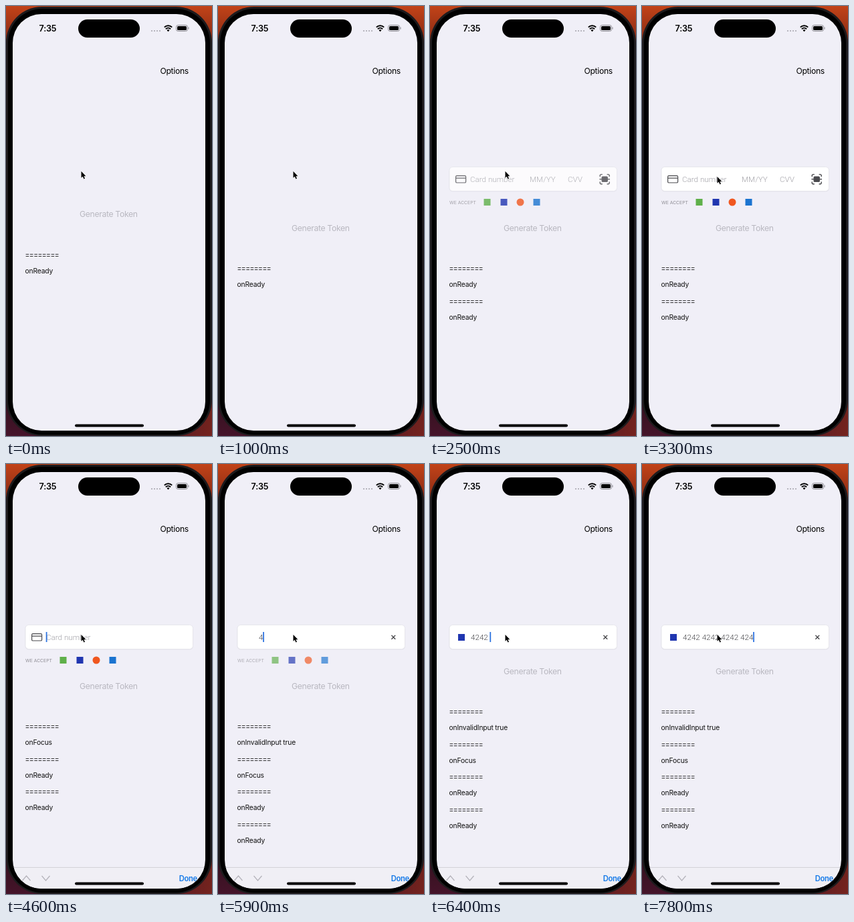
Recreate the animation shown at these times as an HTML page. Size 308 by 640 pixels, loop 8 s.

```html
<!DOCTYPE html>
<html lang="en">
<head>
<meta charset="utf-8">
<title>Card form</title>
<style>
  html, body { margin: 0; width: 100%; height: 100%; overflow: hidden; background: #000; }
  svg { display: block; }
  text { font-family: Inter, sans-serif; }
  .body { font-size: 12.2px; letter-spacing: -.33px; }
  .log text { font-size: 10.3px; letter-spacing: -.16px; fill: #111; }
  .log .rule { letter-spacing: -.5px; }
  .field text { font: 300 11.65px Roboto, sans-serif; }
  .hint { fill: #a3a2a8; }
</style>
</head>
<body>
<svg width="308" height="640" viewBox="0 0 308 640">
  <defs>
    <linearGradient id="wall" x2="0" y2="1">
      <stop stop-color="#c24318"/><stop offset=".1" stop-color="#7a2414"/>
      <stop offset=".9" stop-color="#30101c"/><stop offset="1" stop-color="#45142a"/>
    </linearGradient>
    <linearGradient id="glow" y1="1" x2="1" y2="1">
      <stop offset=".6" stop-color="#8a2a1a" stop-opacity="0"/><stop offset="1" stop-color="#8a2a1a" stop-opacity=".7"/>
    </linearGradient>
    <clipPath id="screen"><rect x="10" y="12" width="288" height="620" rx="43"/></clipPath>
  </defs>
  <rect width="308" height="640" fill="url(#wall)"/>
  <rect y="320" width="308" height="320" fill="url(#glow)"/>
  <rect x="0" y="1" width="308" height="639" rx="54" fill="#1d1b1d"/>
  <rect x="3" y="4" width="302" height="634" rx="51"/>
  <rect x="10" y="12" width="288" height="620" rx="43" fill="#f0eff7"/>

  <!-- status bar -->
  <text x="49.5" y="37.7" font-size="12.6" font-weight="600" letter-spacing="-.2">7:35</text>
  <rect x="108" y="20" width="92" height="27" rx="13.5"/>
  <path d="M218 37h13" stroke="#aaa9b0" stroke-width="2.2" stroke-linecap="round" stroke-dasharray="0 4"/>
  <g fill="none" stroke="#000" stroke-width="2">
    <path d="M236.8 31.6a8 8 0 0 1 11.4 0M238.9 34.2a5.2 5.2 0 0 1 7.2 0"/>
  </g>
  <path d="M242.5 38.2l-2-2.2a2.9 2.9 0 0 1 4 0z"/>
  <rect x="254.5" y="28.5" width="17" height="9" rx="2.8" fill="none" stroke="#8e8d94"/>
  <rect x="256" y="30" width="14" height="6" rx="1.5"/>
  <path d="M273 31.5v3" stroke="#8e8d94"/>

  <text class="body" x="230.5" y="101.3">Options</text>

  <g id="form" class="field">
    <rect x="28.5" y="240" width="251.5" height="36.5" rx="5.5" fill="#dedde5" opacity=".6"/>
    <rect x="29" y="239.5" width="250.5" height="36" rx="5" fill="#fff" stroke="#e3e2e9" stroke-width=".8"/>
    <g id="cardIcon" fill="none" stroke="#4a4a4e" stroke-width="1.2">
      <rect x="38.6" y="252.6" width="15" height="10.4" rx="1.6"/><path d="M38.6 256.2h15"/>
    </g>
    <text id="numberHint" class="hint" x="60" y="262">Card number</text>
    <g id="extras">
      <text class="hint" x="149" y="262">MM/YY</text>
      <text class="hint" x="206" y="262">CVV</text>
      <g fill="none" stroke="#4a4a4e" stroke-width="1.4">
        <path d="M254.2 254v-1.4a2 2 0 0 1 2-2h1.6M264.6 250.6h1.6a2 2 0 0 1 2 2v1.4M268.2 261.6v1.4a2 2 0 0 1-2 2h-1.6M257.8 265h-1.6a2 2 0 0 1-2-2v-1.4"/>
        <rect x="257.2" y="254.2" width="8" height="7.2" rx="1" fill="#4a4a4e"/>
        <path d="M253.4 257.8h15.6"/>
      </g>
    </g>
    <rect id="brand" x="42" y="253" width="10" height="10" fill="#2036b0"/>
    <text id="digits" x="61" y="262" fill="#48484c"></text>
    <path id="clear" d="M259.4 254.9l5.8 5.8m0-5.8l-5.8 5.8" stroke="#3c3c40" stroke-width="1.3"/>
    <rect id="caret" y="250" width="1.8" height="15" fill="#2f74e0"/>
    <g id="accept">
      <text x="29" y="294.6" fill="#8f8e95" style="font:400 6.8px Inter,sans-serif">WE ACCEPT</text>
      <rect x="80.5" y="287" width="10" height="10" fill="#5fb04a"/>
      <rect x="105.5" y="287" width="10" height="10" fill="#2036b0"/>
      <circle cx="135" cy="292" r="5.5" fill="#f0571f"/>
      <rect x="154.5" y="287" width="10" height="10" fill="#1b74d0"/>
    </g>
  </g>

  <g id="lower">
    <text class="body" x="110" y="334.6" fill="#b9b8c0">Generate Token</text>
    <g id="log" class="log"></g>
  </g>

  <g clip-path="url(#screen)">
    <g id="bar">
      <rect x="10" y="600" width="289" height="40" fill="#f0eff5"/>
      <path d="M10 600.5h289" stroke="#d3d2d9"/>
      <path d="M24.5 620l6-7 6 7M53.5 613l6 7 6-7" fill="none" stroke="#b4b3ba" stroke-width="1.2"/>
      <text x="258.7" y="620.6" font-size="11.2" font-weight="600" letter-spacing="-.3" fill="#1479e8">Done</text>
    </g>
  </g>
  <rect x="103" y="622.5" width="103" height="4" rx="2"/>
  <path id="pointer" d="M0 0v9.8l2.3-2 1.6 3.6 1.6-.7-1.6-3.5h3z" stroke="#fff" stroke-width="1" paint-order="stroke"/>
</svg>
<script>
const LOOP = 8000, STEP = 100, ROW = 48.6;
const $ = id => document.getElementById(id);
const ramp = (t, from, to) => Math.min(1, Math.max(0, (t - from) / (to - from)));
const ease = p => p * p * (3 - 2 * p);
const fade = (id, opacity) => $(id).setAttribute('opacity', opacity);
const move = (id, x, y) => $(id).setAttribute('transform', `translate(${x} ${y})`);

const events = [[0, 'onReady'], [2300, 'onReady'], [4400, 'onFocus'], [5900, 'onInvalidInput true']];
$('log').innerHTML = events.map(([, name], i) =>
  `<g id="entry${i}"><text class="rule" x="28.5" y="394.2">========</text><text x="28.5" y="418.2">${name}</text></g>`).join('');

function digitCount(t) {
  if (t < 5900) return 0;
  if (t < 6400) return Math.floor(1 + (t - 5900) / 166);
  if (t < 7400) return Math.min(11, Math.floor(4 + (t - 6400) / 128.5));
  return Math.min(15, Math.floor(12 + (t - 7500) / 100));
}

function caretOpacity(t) {
  if (t < 4400) return 0;
  if (t < 5200) return 1 - ramp(t, 4800, 5100);
  return ramp(t, 5100, 5300);
}

function draw(t) {
  const typing = t >= 5900;

  fade('form', ramp(t, 2100, 2600));
  fade('cardIcon', typing ? 0 : 1);
  fade('numberHint', typing ? 0 : 1);
  fade('extras', 1 - ramp(t, 4300, 4600));
  fade('clear', typing ? 1 : 0);
  fade('brand', ramp(t, 6000, 6300));
  fade('accept', typing ? 1 - ramp(t, 5800, 6100) : 1);

  // A non-breaking space follows every full group of four.
  $('digits').textContent = '42'.repeat(8).slice(0, digitCount(t)).replace(/\d{4}/g, '$&\u00a0');
  $('caret').setAttribute('x', (typing ? 60.7 : 59.7) + $('digits').getComputedTextLength());
  fade('caret', caretOpacity(t));

  const open = ease(ramp(t, -70, 330)), close = ease(ramp(t, 6000, 6400));
  move('lower', 0, -22 * (1 - open + close));

  const shown = events.filter(([start]) => t >= start).length;
  events.forEach((_, i) => {
    fade('entry' + i, i < shown ? 1 : 0);
    move('entry' + i, 0, ROW * (shown - 1 - i));
  });

  move('bar', 0, 40 * (1 - ease(ramp(t, 4200, 4600))));
  move('pointer', 112.5, 246 + 8 * ease(ramp(t, 2800, 3300)));
}

function tick(now) {
  draw(Math.floor(now % LOOP / STEP) * STEP);
  requestAnimationFrame(tick);
}
draw(0);
requestAnimationFrame(tick);
</script>
</body>
</html>
```
